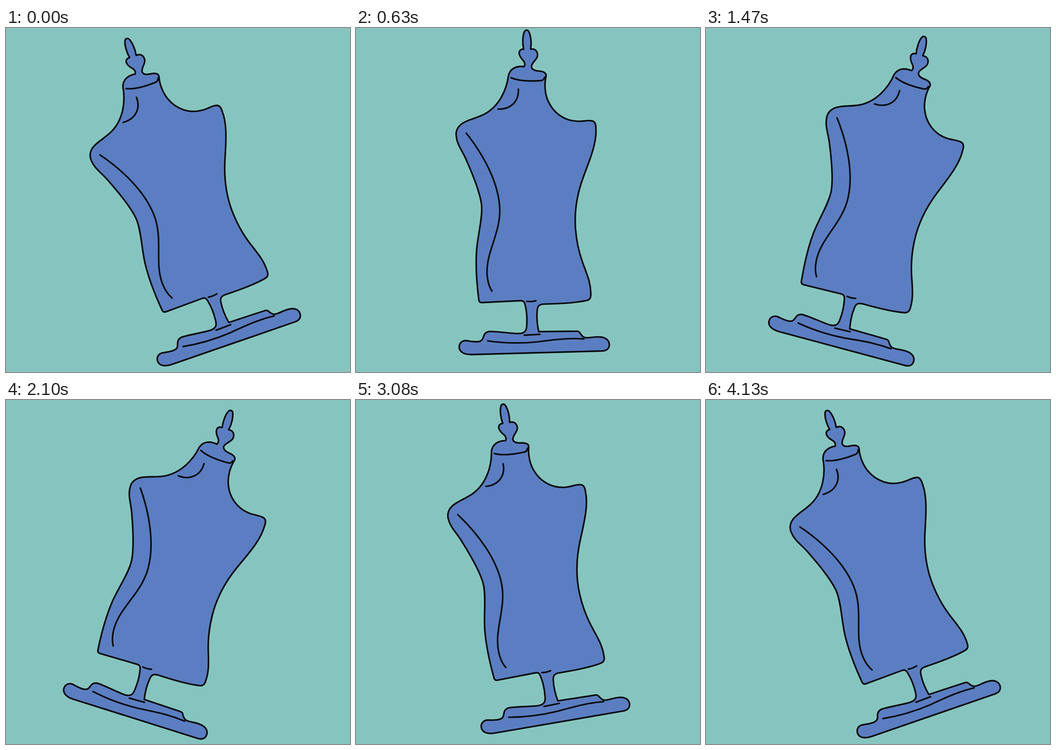
Animation, 748 px wide and 748 px high, one loop 4.2 s. Source, as an HTML page:

```html
<!DOCTYPE html>
<html lang="en">
<head>
<meta charset="utf-8">
<title>Swinging mannequin</title>
<style>
  html, body { margin: 0; width: 100%; height: 100%; overflow: hidden; background: #86c5bf; }
  svg { display: block; width: 100%; height: 100%; }
  path { fill: none; stroke: #080a0c; stroke-width: 3.4; stroke-linecap: round; stroke-linejoin: round; }
  .body { fill: #5b7ec2; }
</style>
</head>
<body>
<svg viewBox="0 0 748 748">
  <g id="figure">
    <!-- silhouette, clockwise from the left shoulder -->
    <path class="body" d="M228 224
      C227 210 236 199 251 194 C264 189 278 187 292 181 C326 166 345 131 351 100
      C357 84 372 81 386 84 C389 80 389 75 384 69 C377 60 374 49 384 46 L388 46
      C386 32 388 16 392 9 C394 4 400 4 402 9 C406 19 406 35 403 47
      C414 46 418 54 417 62 C416 71 403 76 402 85 C402 92 411 95 418 96
      C430 98 434 103 432 109 C427 125 427 145 432 160 C441 188 464 208 494 211
      C506 212 515 210 523 212 C531 213 533 221 532 230
      C532 262 512 300 497 333 C483 364 472 402 472 443 C472 478 478 506 485 528
      C492 552 496 566 495 585 C495 597 491 600 485 601 C460 605 425 604 390 602
      C380 602 377 607 376 615 C373 632 374 647 376 661 L457 666
      C465 666 465 671 468 675 C472 682 478 682 484 682 C491 682 498 681 506 682
      C519 683 527 690 527 699 C527 709 520 713 511 713 L226 700
      C210 699 201 692 201 683 C201 673 209 668 217 669 C227 671 235 674 245 673
      C259 671 251 656 267 653 C277 652 316 661 332 662
      C347 663 350 655 351 645 C353 630 353 615 351 603 C350 594 348 591 340 591
      L258 589 Q251 589 251 582
      C249 545 249 510 254 475 C259 442 272 407 272 380 C272 354 258 311 247 280
      C240 258 228 243 228 224Z"/>
    <!-- inner lines: cap, neck, side, stem, base -->
    <path d="M356 106 C375 116 405 117 420 117 C426 117 428 114 429 110
      M370 132 C370 158 351 175 323 172
      M250 219 C285 270 311 330 311 383 C311 440 273 480 273 530 C273 545 276 557 281 566
      M355 593.5 Q365 595.5 374.5 593.5
      M344 666.5 L378 667
      M264 673 C300 681 330 684 370 683 C420 680 445 680 473 684"/>
  </g>
</svg>
<script>
  const figure = document.getElementById('figure');
  const STEP = 70, STEPS = 60, HALF = STEPS / 2;
  const LEFT = -21.66, SWING = 36.53;

  const bezier = (a, b, s) => 3 * a * s * (1 - s) ** 2 + 3 * b * s * s * (1 - s) + s ** 3;

  // cubic-bezier(.24, 0, .255, 1), solved by bisection
  function ease(x) {
    let lo = 0, hi = 1;
    for (let i = 0; i < 24; i++) {
      const mid = (lo + hi) / 2;
      if (bezier(0.24, 0.255, mid) < x) lo = mid; else hi = mid;
    }
    return bezier(0, 1, lo);
  }

  function draw(now) {
    const n = Math.floor(now / STEP) % STEPS;
    const e = ease(n % HALF / HALF);
    const angle = LEFT + SWING * (n < HALF ? e : 1 - e);
    figure.setAttribute('transform', `rotate(${angle.toFixed(3)} 376 367)`);
  }

  let start;
  function tick(now) {
    start ??= now;
    draw(now - start);
    requestAnimationFrame(tick);
  }
  draw(0);
  requestAnimationFrame(tick);
</script>
</body>
</html>
```
